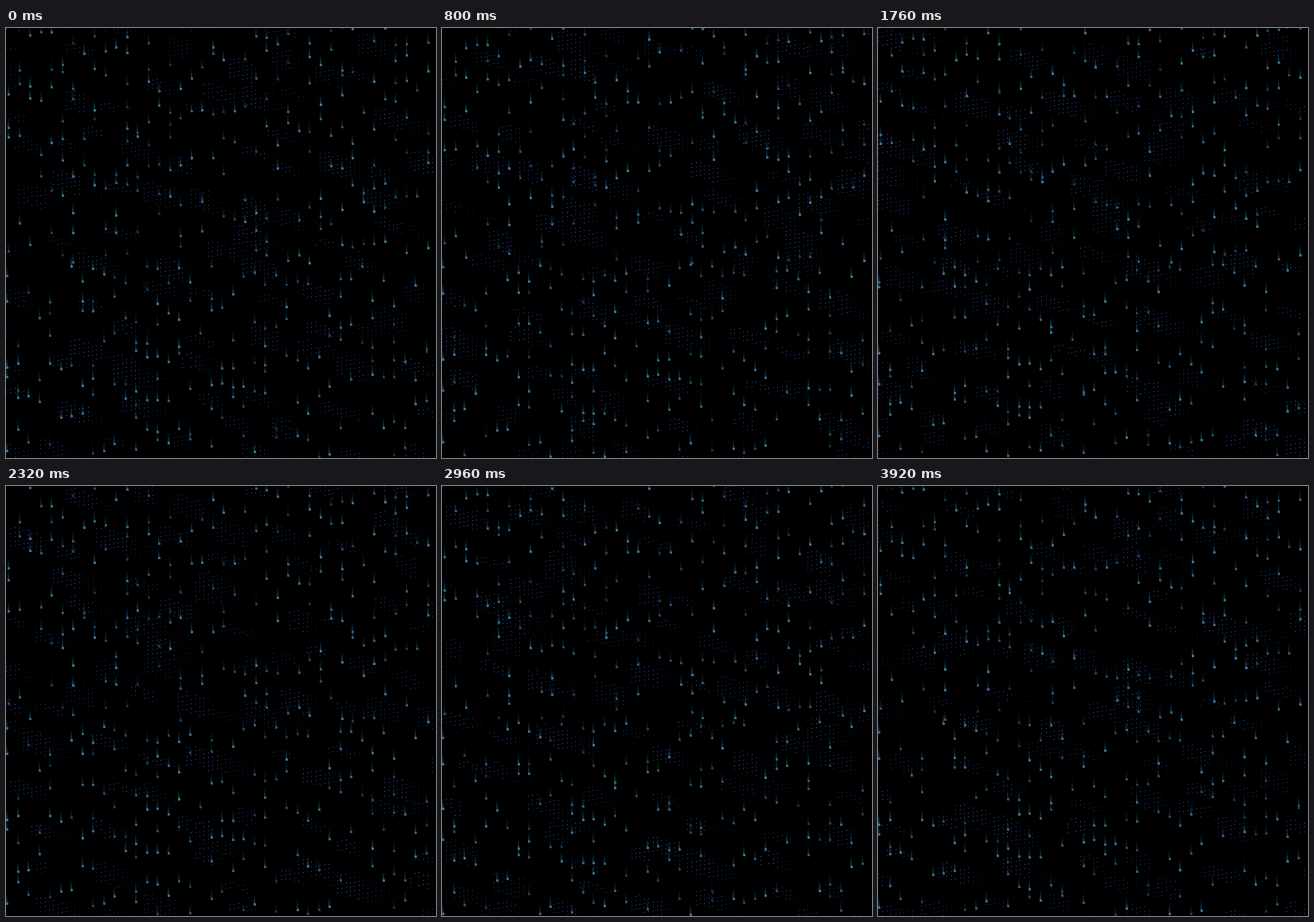
An HTML page with a canvas that plays this animation: 540 px wide and 540 px high, repeating every 4000 ms.

```html
<!DOCTYPE html>
<html lang="en">
<head>
<meta charset="utf-8">
<style>
  html, body { margin: 0; width: 100%; height: 100%; overflow: hidden; background: #000; }
  canvas { display: block; width: 540px; height: 540px; }
</style>
</head>
<body>
<canvas id="stage" width="540" height="540"></canvas>
<script>
const ctx = document.getElementById('stage').getContext('2d');
const SIZE = 540, STEP = 80, STEPS = 50;

// Clouds of dots drift left along a gentle slope and wrap after one loop.
const PITCH = 5.4, TILT = 0.8, SLOPE = 0.26;
const WRAP = 675, MARGIN = 115, ACROSS = 9, DOWN = 16;

// Raindrops sit in a jittered grid and fall whole rows per loop.
const COL = 13.5, ROW = 27, FALLS = 3;

const mod = (a, n) => ((a % n) + n) % n;

function hash(a, b) {
  const s = Math.sin(a * 127.1 + b * 311.7) * 43758.5453;
  return s - Math.floor(s);
}

function drawCloud(x, y, id) {
  const c0 = Math.round(x / PITCH);
  const r0 = Math.round((y + c0 * TILT) / PITCH);
  const rows = 2 + Math.floor(hash(id, 1) * 4);
  const body = 5 + Math.floor(hash(id, 2) * 4);
  const tail = 8 + Math.floor(hash(id, 3) * 6);
  const light = 0.6 + 0.4 * hash(id, 4);
  for (let c = 0; c < body + tail; c++) {
    const sink = Math.floor(c * (SLOPE + TILT / PITCH));
    for (let r = 0; r < rows; r++) {
      const h = hash(id + r * 3.7, c + 9);
      if (h < 0.1) continue;
      const alpha = c < body ? 0.55 + 0.45 * h : 0.32 * (1 - (c - body) / tail);
      ctx.fillStyle = `rgba(62, 96, 245, ${alpha * light})`;
      ctx.fillRect(
        Math.round((c0 + c) * PITCH),
        Math.round((r0 + r + sink) * PITCH - (c0 + c) * TILT), 1, 1);
    }
  }
}

function drawClouds(step) {
  const shift = step / STEPS * WRAP;
  for (let i = 0; i < ACROSS; i++) {
    for (let j = 0; j < DOWN; j++) {
      const home = (i + hash(i, j + 20)) * WRAP / ACROSS;
      const x = mod(home - shift, WRAP) - MARGIN;
      const lane = (j + hash(i + 30, j)) * (SIZE + 170) / DOWN - 150;
      drawCloud(x, lane + x * SLOPE, i * DOWN + j);
    }
  }
}

function drawDrop(x, y, light) {
  const tail = ctx.createLinearGradient(0, y - 14, 0, y);
  tail.addColorStop(0, 'rgba(18, 58, 70, 0)');
  tail.addColorStop(1, `rgba(30, 84, 108, ${light})`);
  ctx.fillStyle = tail;
  ctx.fillRect(x, y - 14, 2, 14);
  ctx.fillStyle = `rgba(60, 122, 166, ${light})`;
  ctx.fillRect(x, y - 2, 3, 3);
}

function drawRain(step) {
  const fall = step / STEPS * FALLS * ROW;
  for (let c = 0; c < SIZE / COL; c++) {
    for (let r = 0; r < SIZE / ROW; r++) {
      if (hash(c, r + 40) > 0.48) continue;
      const x = Math.round(c * COL + (r < 11 ? 2 : 0));
      const y = Math.round(r * ROW + (hash(c + 5, r) * ROW + fall) % ROW);
      drawDrop(x, y, 0.3 + 0.65 * hash(c, r + 90));
    }
  }
}

function draw(step) {
  ctx.fillStyle = '#000';
  ctx.fillRect(0, 0, SIZE, SIZE);
  drawClouds(step);
  drawRain(step);
}

let last = -1;
const start = performance.now();
function tick() {
  const step = Math.floor((performance.now() - start) / STEP) % STEPS;
  if (step !== last) draw(last = step);
  requestAnimationFrame(tick);
}
tick();
</script>
</body>
</html>
```
